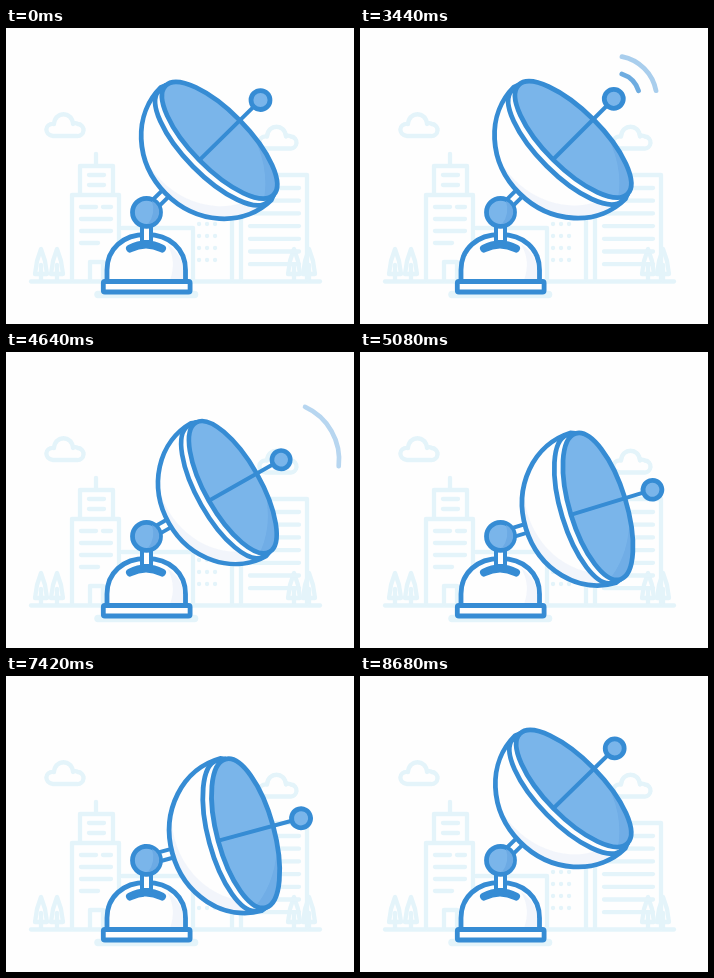
Recreate the animation shown at these times as an HTML page. Size 348 by 296 pixels, loop 8700 ms.

```html
<!DOCTYPE html>
<html lang="en">
<head>
<meta charset="utf-8">
<title>Satellite dish</title>
<style>
  html, body { margin: 0; width: 100%; height: 100%; overflow: hidden; background: #fefefe; }
  svg { display: block; fill: none; stroke-linecap: round; stroke-linejoin: round; }
  .city { stroke: #e4f4fa; stroke-width: 4.3; }
  .line { stroke: #368cd4; stroke-width: 4.8; }
  .thin { stroke-width: 4; }
  .white { fill: #fefefe; }
  .blue { fill: #7ab5ea; }
  .shade { fill: #f2f5fb; stroke: none; }
  .plain { stroke: none; }
</style>
</head>
<body>
<svg width="348" height="296" viewBox="0 0 348 296">
  <defs>
    <path id="cloud" d="M47 108H71A6 6 0 0 0 72 96C70 95 68 95 67 96C66 83 49 83 48 96C38 95 38 107 47 108Z"/>
    <path id="tree" d="M0 221L-4 233L-6 246H6L4 233ZM0 237V252"/>
    <path id="bowl" d="M103 -77L98 -79A71 79 0 0 0 98 79L103 77"/>
    <ellipse id="face" cx="103" rx="28.5" ry="77"/>
    <clipPath id="bowlClip"><use href="#bowl"/></clipPath>
    <clipPath id="faceClip"><use href="#face"/></clipPath>
  </defs>

  <g class="city">
    <use href="#cloud"/>
    <use href="#cloud" x="213" y="12.5"/>
    <use href="#tree" x="35"/>
    <use href="#tree" x="51"/>
    <use href="#tree" x="288"/>
    <use href="#tree" x="303"/>
    <path d="M25 253.5H314"/>
    <path d="M92 266.500H188.500" style="stroke-width:7.5"/>
    <path d="M66 252V167H113V252M74 167V138H107V167M90 138V126M84 252V234H97V252"/>
    <path d="M83 147H98M83 157H98M75 179H90M97 179H105M75 191H105M75 203H105M75 215H92"/>
    <path d="M116 200H187V252M226 252V190M235 252V147H301V252"/>
    <path id="windows"/>
    <path id="dots"/>
  </g>

  <g id="dish">
    <path class="line white thin" d="M10 -4.500H34V4.500H10Z"/>
    <g clip-path="url(#bowlClip)">
      <rect class="shade" x="20" y="-82" width="90" height="164"/>
      <ellipse class="white plain" cx="105" cy="-13" rx="72" ry="81"/>
    </g>
    <use href="#bowl" class="line"/>
    <path class="line white" d="M103 -77L94.500 -78A29 78 0 0 0 94.500 78L103 77"/>
    <use href="#face" class="blue"/>
    <path clip-path="url(#faceClip)" d="M136 -10Q130 46 95 72L110 84L142 60Z" fill="#70ade6"/>
    <use href="#face" class="line"/>
    <path class="line thin" d="M75 0H150"/>
    <circle class="line blue" cx="160.500" r="9.500"/>
    <g id="waves" class="line"></g>
  </g>

  <path class="line white" d="M101 254V242C101 221 117 206.500 140.300 206.500S179.500 221 179.500 242V254Z"/>
  <path class="shade" d="M164 252Q171 233 161 216Q177 227 177 242V252Z"/>
  <path class="line" d="M124 220.500Q140 212.500 156 220.500" style="stroke-width:8"/>
  <path class="line white thin" d="M136 199V214H145V199"/>
  <circle class="line blue" cx="140.500" cy="184.300" r="14"/>
  <path d="M146 173A12 12 0 0 1 142 196Q150 186 146 173Z" fill="#6caae4"/>
  <rect class="line white" x="97.300" y="253.500" width="86.800" height="10.500" rx="1.500"/>
</svg>
<script>
const LOOP = 8700, FADE = 240, RAD = Math.PI / 180;
const HIGH = -45 * RAD, LOW = -15 * RAD;
const byId = id => document.getElementById(id);
const clamp = x => Math.max(0, Math.min(1, x));
const mix = (a, b, p) => a + (b - a) * p;
const ease = (t, from, to) => {
  const x = clamp((t - from) / (to - from));
  return x * x * x * (10 - 15 * x + 6 * x * x);
};

// Start of each signal and when its innermost arc begins to fade away
const signals = [[360, 720], [1720, 2090], [3060, 4040]];

let windows = '', dots = '';
for (let y = 160; y < 245; y += 12.7) windows += `M244 ${y}H293`;
for (let y = 196; y < 240; y += 12)
  for (let x = 193; x < 212; x += 8) dots += `M${x} ${y}h.1`;
byId('windows').setAttribute('d', windows);
byId('dots').setAttribute('d', dots);

const arcs = [[26, 27], [43, 34], [60, 36]].map(([r, degrees]) => {
  const x = 160.5 + r * Math.cos(degrees * RAD), y = r * Math.sin(degrees * RAD);
  const arc = document.createElementNS('http://www.w3.org/2000/svg', 'path');
  arc.setAttribute('d', `M${x} ${-y}A${r} ${r} 0 0 1 ${x} ${y}`);
  byId('waves').append(arc);
  return arc;
});

// Share of the way down; the return swing ends just after the loop restarts
const lowered = t => ease(t, 3840, 5420) - ease(t, 7270, 8910);

function draw(t) {
  // Every point of the dish travels straight between its two poses
  const p = lowered(t < 1000 ? t + LOOP : t);
  const c = mix(Math.cos(HIGH), Math.cos(LOW), p);
  const s = mix(Math.sin(HIGH), Math.sin(LOW), p);
  byId('dish').setAttribute('transform', `matrix(${c} ${s} ${-s} ${c} 140.3 184.3)`);
  arcs.forEach((arc, i) => {
    const delay = i * FADE;
    const levels = signals.map(([on, off]) =>
      clamp((t - on - delay) / FADE) * clamp(1 - (t - off - delay) / FADE));
    arc.style.opacity = 0.72 * Math.max(...levels);
  });
}

function frame() {
  draw(performance.now() % LOOP);
  requestAnimationFrame(frame);
}
frame();
</script>
</body>
</html>
```
